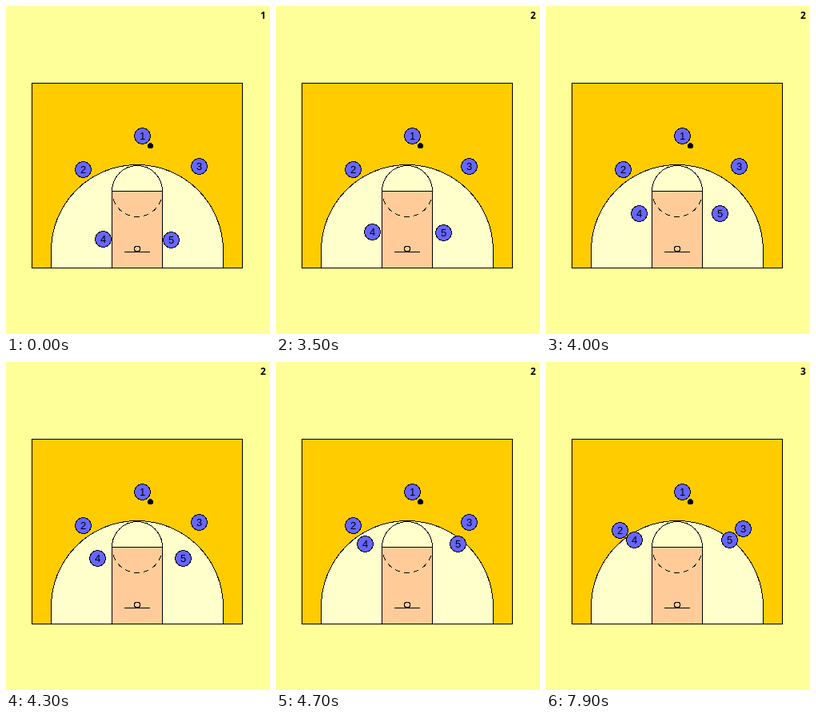
Animation, 330 px wide and 410 px high, one loop 8 s. Source, as an HTML page:

```html
<!DOCTYPE html>
<html lang="en">
<head>
<meta charset="utf-8">
<title>Basketball play</title>
<style>
  html, body { margin: 0; width: 100%; height: 100%; overflow: hidden; background: #ff9; }
  svg { display: block; width: 330px; height: 410px; }
  .shapes { stroke: #000; stroke-width: 1; fill: none; shape-rendering: crispEdges; }
  .player circle { fill: #66f; stroke: #000; shape-rendering: crispEdges; }
  .player text { font: 13px "Liberation Sans", Arial, sans-serif; text-anchor: middle; }
  #step { font: bold 12px "Open Sans", "Noto Sans", sans-serif; text-anchor: middle; }
</style>
</head>
<body>
<svg viewBox="0 0 330 410">
  <g class="shapes">
    <rect x="32.5" y="96.5" width="263" height="231" fill="#fc0"/>
    <path d="M56.5 327.5V306A107.5 107.5 0 0 1 271.5 306V327.5Z" fill="#ffc"/>
    <rect x="132.5" y="231.5" width="63" height="96" fill="#fc9"/>
    <path d="M132.5 231.5A31.5 32 0 0 1 195.5 231.5"/>
    <path d="M132.5 231.5A31.5 32 0 0 0 195.5 231.5" stroke-dasharray="7 5" stroke-dashoffset="2"/>
    <circle cx="164" cy="303.5" r="3.5"/>
    <path d="M148 307.5H180"/>
    <circle cx="180.5" cy="174.5" r="3" fill="#000"/>
  </g>
  <g class="shapes" id="screens">
    <path d="M115.5 278L108.5 220.5M102 221.5L115 219.5"/>
    <path d="M213.5 279L229.5 218.5M224 216.5L236 219.5"/>
  </g>
  <g id="players"></g>
  <text id="step" x="321.5" y="16"></text>
</svg>
<script>
  const LOOP = 8000, TICK = 100;
  const RUN = 3500, RUN_TICKS = 15, LEAD = 2;
  const CUT = 7900;

  const spots = [
    { from: [170.5, 162.5] },
    { from: [96.5, 204.5], cut: [92.5, 210.5] },
    { from: [241.5, 200.5], cut: [246.5, 208.5] },
    { from: [121.5, 291.5], run: [110.5, 222.5] },
    { from: [206.5, 292.5], run: [229.5, 222.5] }
  ];

  const NS = "http://www.w3.org/2000/svg";
  const byId = id => document.getElementById(id);

  function add(parent, tag, attrs) {
    const el = document.createElementNS(NS, tag);
    for (const key in attrs) el.setAttribute(key, attrs[key]);
    return parent.appendChild(el);
  }

  const players = spots.map((spot, i) => {
    const g = add(byId("players"), "g", { class: "player" });
    add(g, "circle", { r: 10 });
    add(g, "text", { x: 0, y: 4.5 }).textContent = i + 1;
    return g;
  });

  // Players move in whole pixels, one step per tick.
  const snap = v => Math.floor(v) + 0.5;

  function place(spot, t) {
    if (spot.cut && t >= CUT) return spot.cut;
    if (!spot.run || t < RUN) return spot.from;
    const ticks = Math.floor((t - RUN) / TICK) + LEAD;
    const p = Math.min(1, ticks / RUN_TICKS);
    return spot.from.map((v, i) => snap(v + (spot.run[i] - v) * p));
  }

  function draw(t) {
    spots.forEach((spot, i) => {
      players[i].setAttribute("transform", `translate(${place(spot, t)})`);
    });
    byId("screens").style.display = t >= 500 && t < RUN ? "" : "none";
    byId("step").textContent = t < 500 ? 1 : t < 4900 ? 2 : 3;
  }

  const start = performance.now();
  function frame() {
    draw((performance.now() - start) % LOOP);
    requestAnimationFrame(frame);
  }
  draw(0);
  requestAnimationFrame(frame);
</script>
</body>
</html>
```
